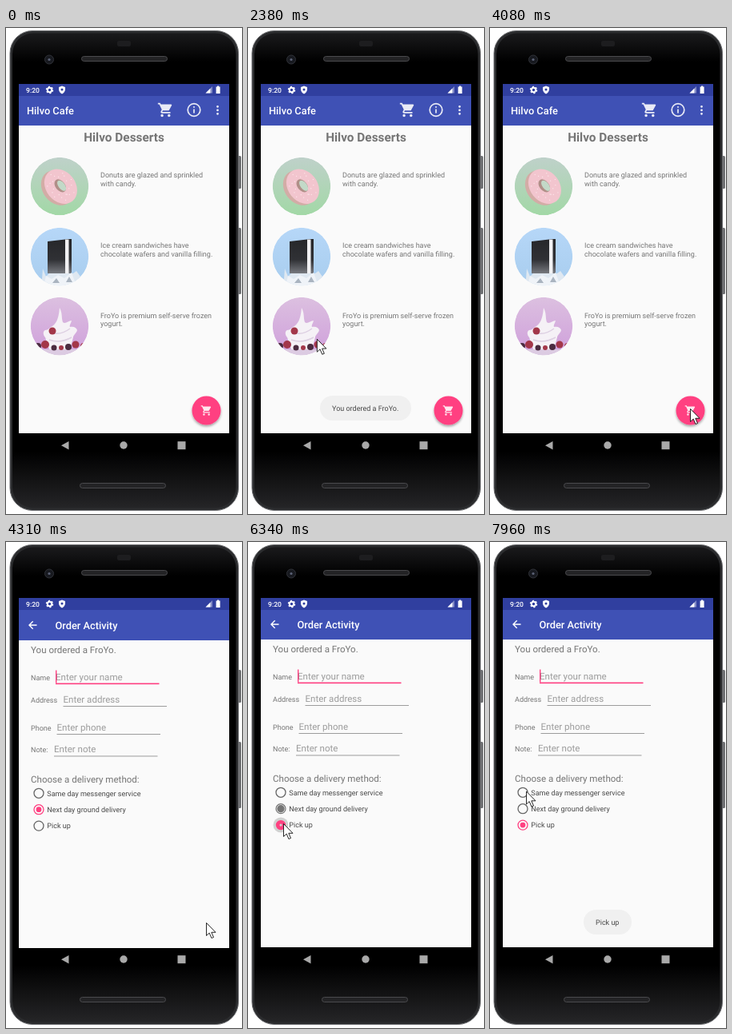
Write an HTML page that moves like this. It is 295x608 px and loops after 8000 ms.

```html
<!DOCTYPE html>
<html lang="en">
<head>
<meta charset="utf-8">
<title>Dessert order demo</title>
<style>
  html, body { margin: 0; width: 100%; height: 100%; overflow: hidden; background: #fff; }
  svg { display: block; width: 295px; height: 608px; }
  text { font: 9.03px Roboto, sans-serif; fill: #757575; text-rendering: geometricPrecision; }
  .title { font-size: 12.8px; font-weight: 500; fill: #fff; }
  .big { font-size: 11.55px; }
  .hint { font-size: 11.55px; fill: #9c9c9c; }
  .dark { fill: #484848; }
</style>
</head>
<body>
<svg viewBox="0 0 295 608">
  <defs>
    <linearGradient id="face" x2="0" y2="1"><stop stop-color="#1a1a1c"/><stop offset=".06"/><stop offset=".88"/><stop offset="1" stop-color="#252527"/></linearGradient>
    <linearGradient id="green" x2="0" y2="1"><stop stop-color="#bfd1ca"/><stop offset="1" stop-color="#a2d8a6"/></linearGradient>
    <linearGradient id="blue" x2="0" y2="1"><stop stop-color="#b6d7f8"/><stop offset="1" stop-color="#a8cdee"/></linearGradient>
    <linearGradient id="purple" x2="0" y2="1"><stop stop-color="#dcc0e0"/><stop offset="1" stop-color="#cf9fdb"/></linearGradient>
    <linearGradient id="wafer" x2="0" y2="1"><stop stop-color="#26272a"/><stop offset=".6" stop-color="#303135"/><stop offset="1" stop-color="#77797f"/></linearGradient>
    <filter id="shadow" x="-30%" y="-30%" width="160%" height="170%"><feDropShadow dx="0" dy="2" stdDeviation="1.8" flood-opacity=".35"/></filter>
    <clipPath id="disc"><circle r="36.3"/></clipPath>
    <clipPath id="screen"><rect x="16" y="70" width="263" height="466"/></clipPath>
    <clipPath id="reveal"><rect id="revealRect" x="16" y="70" width="263" height="437"/></clipPath>
    <path id="cart" d="M7 18a2 2 0 1 0 0 4 2 2 0 0 0 0-4zM1 2v2h2l3.6 7.6-1.35 2.44C4.5 15.4 5.5 17 7 17h12v-2H7.42q-.3-.05-.22-.37l.9-1.63h7.45q1.2-.05 1.75-1.03l3.58-6.49Q21.3 4.3 20 4H5.21l-.94-2zM17 18a2 2 0 1 0 0 4 2 2 0 0 0 0-4z"/>
    <g id="window">
      <rect x="16" y="70" width="263" height="437" fill="#fafafa"/>
      <rect x="16" y="70" width="263" height="52" fill="#3f51b5"/>
    </g>
  </defs>

  <!-- phone -->
  <g fill="#6f7073">
    <rect x="289" y="160" width="5" height="41" rx="1.5"/>
    <rect x="289" y="250" width="5" height="83" rx="1.5"/>
  </g>
  <rect x="5" y="3.5" width="285.500" height="600" rx="28" fill="#2b2c2e" stroke="#6a6b6e"/>
  <rect x="8" y="6.500" width="279.500" height="594" rx="26" fill="url(#face)"/>
  <rect x="139" y="16" width="17" height="7" rx="2" fill="#1d1d1f"/>
  <g fill="#232325" stroke="#4a4a4d">
    <rect x="94.5" y="35.5" width="107" height="6" rx="3"/>
    <rect x="92.5" y="569.5" width="107" height="6" rx="3"/>
  </g>
  <circle cx="54" cy="39.500" r="5.500" fill="#17191f" stroke="#303238"/>
  <circle cx="54" cy="39.500" r="1.600" fill="#5c6276"/>

  <g clip-path="url(#screen)">
    <!-- dessert list -->
    <g id="menu">
      <use href="#window"/>
      <text class="title" x="26" y="107.500">Hilvo Cafe</text>
      <use href="#cart" fill="#e9ebf6" transform="translate(189 92) scale(.87)"/>
      <g stroke="#e9ebf6" stroke-width="1.7" fill="none">
        <circle cx="235" cy="102.500" r="7.800"/>
        <path d="M235 101.500v5M235 98v1.800"/>
      </g>
      <path d="M264.500 98.300v.01m0 4.500v.01m0 4.500v.01" stroke="#fff" stroke-width="2.700" stroke-linecap="round"/>
      <text x="147.500" y="142" text-anchor="middle" style="font-size:15.36px;font-weight:700">Hilvo Desserts</text>

      <g transform="translate(67 198)" clip-path="url(#disc)">
        <circle r="36.300" fill="url(#green)"/>
        <g transform="rotate(52)">
          <ellipse cx="0" cy="3" rx="23.500" ry="19" fill="#d3aca6"/>
          <ellipse cx="1" cy="-1" rx="23.500" ry="18.500" fill="#f2c5ce"/>
          <ellipse cx="0" cy="-1" rx="9" ry="6" fill="#b08f88"/>
          <ellipse cx="1" cy="-2.500" rx="7.500" ry="4" fill="#c3d9c8"/>
          <g id="sprinkles" stroke="#fff0f2" stroke-width="1"></g>
        </g>
      </g>
      <g transform="translate(67 286)" clip-path="url(#disc)">
        <circle r="36.300" fill="url(#blue)"/>
        <path d="M-26 37l4-9 1-13 4 10 4-4 30 0 4-3 5 7 6 12z" fill="#dfe8f1"/>
        <path d="M-15-19L11-22H15V21H-15z" fill="url(#wafer)"/>
        <path d="M7-21.500h4.500V21H7z" fill="#f0f0f2"/>
        <path d="M-20 37l3-13 7 4 8-5 8 4 9-7 6 17z" fill="#eff3f8"/>
        <path d="M-9 33l5-6 4 6zM8 32l4-7 4 7z" fill="#aab4c0"/>
      </g>
      <g transform="translate(67 373)" clip-path="url(#disc)">
        <circle r="36.300" fill="url(#purple)"/>
        <path d="M-37 29H37V38H-37z" fill="#dccbe2"/>
        <path d="M0-23c4 8 2 12 4 18 3 3 7-2 11-2-1 4-3 6-2 8 5-1 8 1 9 4-1 4-5 6-5 9l-4 15h-26l-5-15c-3-3-3-8 0-9 4 0 5-3 9-5 7-5 8-14 9-23z" fill="#f5f1f6"/>
        <path d="M-10 8q11 4 23-5M-13 17q14 5 28-3" fill="none" stroke="#ddd0e2" stroke-width="1.500"/>
        <g fill="#a3374a">
          <circle cx="-9" cy="6" r="4.500"/><circle cx="-18" cy="23" r="5"/>
          <circle cx="2" cy="27" r="3"/><circle cx="20" cy="23" r="4.500"/><circle cx="30" cy="25" r="4"/>
        </g>
        <g fill="#4b2c40">
          <circle cx="-27" cy="25" r="4"/><circle cx="-7" cy="27" r="3.500"/><circle cx="11" cy="26" r="4"/>
        </g>
      </g>

      <text x="118" y="187">Donuts are glazed and sprinkled</text>
      <text x="118" y="197.500">with candy.</text>
      <text x="118" y="275">Ice cream sandwiches have</text>
      <text x="118" y="285.500">chocolate wafers and vanilla filling.</text>
      <text x="118" y="362.500">FroYo is premium self-serve frozen</text>
      <text x="118" y="373">yogurt.</text>

      <circle cx="250.500" cy="478.500" r="18" fill="#ff4081" filter="url(#shadow)"/>
      <use href="#cart" fill="#ffe6ee" transform="translate(243.1 471) scale(.62)"/>
    </g>

    <!-- order form -->
    <g id="order" clip-path="url(#reveal)">
      <use href="#window"/>
      <path d="M38.500 103H29m4.700-4.700L29 103l4.700 4.700" fill="none" stroke="#fff" stroke-width="1.400"/>
      <text class="title" x="61.500" y="107.500">Order Activity</text>
      <text class="big" x="31" y="138">You ordered a FroYo.</text>
      <g id="fields"></g>
      <rect id="caret" x="62" y="159.500" width="1.400" height="16" fill="#ff4081"/>
      <text class="big" x="31" y="299.500">Choose a delivery method:</text>
      <circle id="ripple" cx="41" cy="354" fill="#000"/>
      <g id="radios"></g>
    </g>

    <g id="toastOrder">
      <rect x="90" y="460" width="114" height="31" rx="15.500" fill="#f0f0f0"/>
      <text class="dark" x="105" y="479">You ordered a FroYo.</text>
    </g>
    <g id="toastPickup">
      <rect x="117" y="460" width="60" height="31" rx="15.500" fill="#f0f0f0"/>
      <text class="dark" x="132" y="479">Pick up</text>
    </g>
    <rect x="16" y="70" width="263" height="15" fill="#303f9f"/>
  </g>

  <!-- system bars -->
  <text x="25" y="81" style="font-weight:500;font-size:8.600px;fill:#fff">9:20</text>
  <g fill="#fff">
    <circle cx="54.500" cy="77.500" r="2.700" fill="none" stroke="#fff" stroke-width="2"/>
    <circle cx="54.500" cy="77.500" r="4.100" fill="none" stroke="#fff" stroke-width="1.300" stroke-dasharray="2.150"/>
    <path d="M70 72.500l4 1.600v3q-.5 4-4 5.400-3.500-1.400-4-5.400v-3z"/>
    <circle cx="70" cy="77" r="1.500" fill="#303f9f"/>
    <path d="M258 73v8.500h-8.500z" opacity=".4"/>
    <path d="M255.500 75.500v6h-6z"/>
    <path d="M264 72.500h2.200v1h1.400v8.500h-5v-8.500h1.400z"/>
  </g>
  <g fill="#a9a9a9">
    <path d="M78.500 517v10.400l-9.500-5.200z"/>
    <circle cx="147" cy="522" r="4.700"/>
    <rect x="214.500" y="517.200" width="10" height="10"/>
  </g>

  <circle id="tap" r="12" fill="#f0cb3c" opacity=".72"/>
  <path id="pointer" d="M0 0V16L3.700 12.600L6.400 19L9 18L6.300 11.800H11.500Z" fill="#fff" stroke="#111" stroke-width=".9"/>
</svg>

<script>
const LOOP = 8000, STEP = 77.42, FIRST = 446;
const $ = id => document.getElementById(id);
const clamp = v => Math.min(1, Math.max(0, v));
const ramp = (t, from, to) => clamp((t - from) / (to - from));
const ease = u => (1 - Math.cos(Math.PI * u)) / 2;
const show = (id, visible) => $(id).style.display = visible ? '' : 'none';

// label, hint, left edge of input, baseline
$('fields').innerHTML = [
  ['Name', 'Enter your name', 62, 171.5],
  ['Address', 'Enter address', 71.5, 199.5],
  ['Phone', 'Enter phone', 63.5, 234.5],
  ['Note:', 'Enter note', 60, 262]
].map(([label, hint, x, y], i) => `
  <text x="31" y="${y}">${label}</text>
  <text class="hint" x="${x}" y="${y}">${hint}</text>
  <rect x="${x}" y="${y + (i ? 4.5 : 4)}" width="129.500" height="${i ? .9 : 1.6}" fill="${i ? '#929292' : '#ff4081'}"/>`).join('');

$('radios').innerHTML = ['Same day messenger service', 'Next day ground delivery', 'Pick up']
  .map((label, i) => `<g transform="translate(41 ${313.3 + 20.4 * i})">
    <circle fill="none"/><circle/><text class="dark" x="10.300" y="3.200">${label}</text></g>`).join('');

$('sprinkles').innerHTML = Array.from({ length: 22 }, (_, i) => {
  const angle = i * 2.4, reach = .55 + (i % 3) * .15;
  return `<path d="M${1 + 22 * reach * Math.cos(angle)} ${18 * reach * Math.sin(angle) - 1}l${Math.cos(i * 5)} ${Math.sin(i * 5)}"/>`;
}).join('');

// start time, end time, start point, end point
const moves = [
  [370, 1220, 232, 611, 75.5, 383.5],
  [2233, 3160, 75.5, 383.5, 250.5, 476.5],
  [4785, 5795, 250.5, 476.5, 44.5, 352.5],
  [7180, 7645, 44.5, 352.5, 45.5, 312]
];
const taps = [1370, 3470, 6030, 7880];

function pointerAt(t) {
  const [from, to, x0, y0, x1, y1] = moves.filter((m, i) => !i || t >= m[0]).pop();
  const u = ease(ramp(t, from, to));
  return [x0 + (x1 - x0) * u, y0 + (y1 - y0) * u];
}

const IDLE = { ring: 6, width: 1.3, dot: 0, color: '#666' };
const CHOSEN = { ring: 6, width: 1.3, dot: 3.4, color: '#ff4081' };
const LEAVING = { ring: 6, width: 1.2, dot: 4.7, color: '#757575' };
const ENTERING = { ring: 3.9, width: 4.6, dot: 0, color: '#ff4081' };

function drawRadios(t) {
  const states = t < 6300 ? [IDLE, CHOSEN, IDLE]
    : t < 6380 ? [IDLE, LEAVING, ENTERING] : [IDLE, IDLE, CHOSEN];
  states.forEach((s, i) => {
    const [ring, dot] = $('radios').children[i].children;
    ring.setAttribute('r', s.ring);
    ring.setAttribute('stroke', s.color);
    ring.setAttribute('stroke-width', s.width);
    dot.setAttribute('r', s.dot);
    dot.setAttribute('fill', s.color);
  });
  $('ripple').setAttribute('r', 7 + 5 * ramp(t, 6240, 6420));
  $('ripple').setAttribute('opacity', t < 6240 ? 0 : .16 * (1 - ramp(t, 6400, 6640)));
}

function draw(time) {
  const t = FIRST + STEP * Math.floor((time - 450) / STEP + .16);

  const opened = 1 - (1 - ramp(t, 4085, 4395)) ** 2.5;
  $('menu').setAttribute('transform', `translate(0 ${Math.round(-9 * opened)})`);
  $('order').setAttribute('transform', `translate(0 ${Math.round(19 * (1 - opened))})`);
  $('revealRect').setAttribute('y', 70 + 437 * (1 - opened));
  $('revealRect').setAttribute('height', 437 * opened);
  show('order', opened > 0);
  show('caret', t < 4540 || Math.floor((t - 4540) / 486) % 2);
  drawRadios(t);

  $('toastOrder').setAttribute('opacity', Math.min(ramp(t, 1530, 1820), 1 - ramp(t, 3680, 3980)));
  $('toastPickup').setAttribute('opacity', ramp(t, 6380, 6700));

  const place = `translate(${pointerAt(t)})`;
  $('pointer').setAttribute('transform', place);
  $('tap').setAttribute('transform', place);
  show('pointer', t > 440);
  show('tap', taps.some(start => t > start - 15 && t < start + 60));
}

function loop() {
  draw(performance.now() % LOOP);
  requestAnimationFrame(loop);
}
loop();
</script>
</body>
</html>
```
